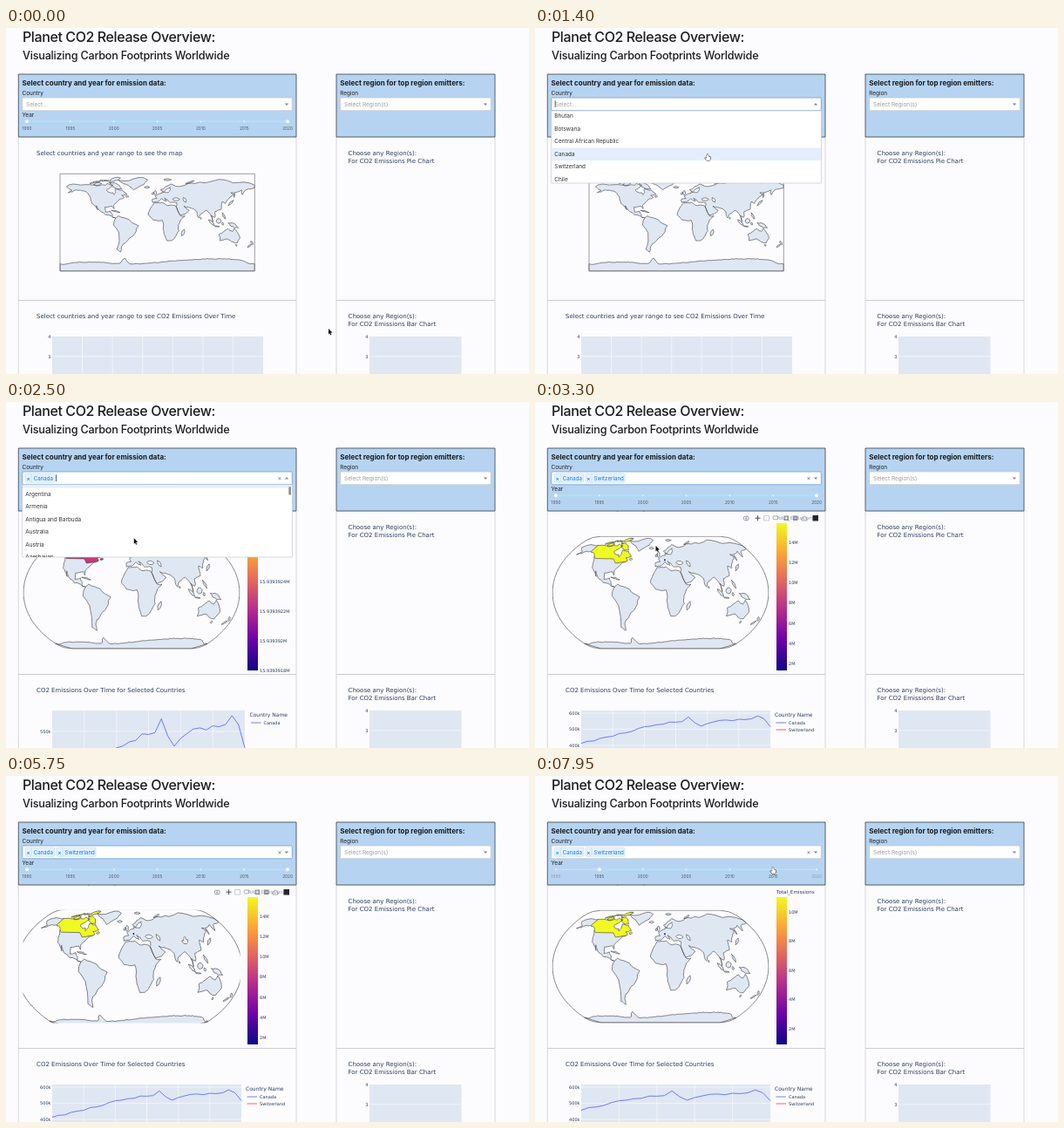
Animation of 600 by 397 pixels, one loop 8000 ms. Source, as an HTML page with a canvas:

```html
<!DOCTYPE html>
<html lang="en">
<head>
<meta charset="utf-8">
<title>Emission dashboard</title>
<style>
html, body { margin: 0; width: 100%; height: 100%; overflow: hidden; background: #fcfbfd; }
canvas { display: block; width: 600px; height: 397px; }
</style>
</head>
<body>
<canvas id="stage"></canvas>
<script>
const LOOP = 8000;
const canvas = document.getElementById('stage');
const ctx = canvas.getContext('2d');
const dpr = window.devicePixelRatio || 1;
canvas.width = 600 * dpr;
canvas.height = 397 * dpr;

const UI = 'Inter, sans-serif', PLOT = '"DejaVu Sans", sans-serif';
const PAPER = '#fcfbfd', LAND = '#dfe7f2', INK = '#2a3f5f', COAST = '#3c3c40';
const PLASMA = ['#0d0887', '#6a00a8', '#b12a90', '#e16462', '#fca636', '#f0f921'];

const ease = (t, a, b) => {
  const p = Math.min(1, Math.max(0, (t - a) / (b - a)));
  return p * p * (3 - 2 * p);
};
const between = (t, a, b) => t >= a && t < b;
const bump = (x, center, width, height) => height * Math.exp(-(((x - center) / width) ** 2));
const range = (n, f) => Array.from({ length: n }, (_, i) => f(i));

// ---- World geometry: a few key points per coast, roughened by a seeded rule ----
const noise = (x, y) => {
  const s = Math.sin(x * 12.9898 + y * 78.233) * 43758.5453;
  return s - Math.floor(s) - 0.5;
};

function roughen(points, depth = 2) {
  if (!depth) return points;
  const finer = points.flatMap(([x, y], i) => {
    const [u, v] = points[(i + 1) % points.length];
    const k = 0.22 * noise(x + u, y + v);
    return [[x, y], [Math.min(180, (x + u) / 2 + (v - y) * k), (y + v) / 2 - (u - x) * k]];
  });
  return roughen(finer, depth - 1);
}

// An island or lake: a lens between two ends
function lens([x, y, u, v, width]) {
  const len = Math.hypot(u - x, v - y), nx = (v - y) / len * width, ny = (x - u) / len * width;
  const side = (p, s) => [x + (u - x) * p + nx * s, y + (v - y) * p + ny * s];
  return roughen([[x, y], side(0.3, 1), side(0.7, 1), [u, v], side(0.7, -1), side(0.3, -1)], 1);
}

const continents = [
  // North America
  [[-168,66], [-156,71], [-128,70], [-108,68], [-95,69], [-93,72], [-82,69], [-87,64], [-94,60], [-92,57], [-82,55], [-80,51], [-77,56], [-78,62], [-70,60], [-65,60], [-56,52], [-66,50], [-61,46], [-70,43], [-76,36], [-81,31], [-80,25], [-84,30], [-97,28], [-96,19], [-87,21], [-83,15], [-82,9], [-77,8], [-86,12], [-105,20], [-113,31], [-110,23], [-121,35], [-124,47], [-135,58], [-150,60], [-165,55], [-158,59]],
  // South America
  [[-77,8], [-72,12], [-52,5], [-35,-6], [-39,-16], [-48,-27], [-57,-36], [-66,-45], [-68,-55], [-75,-50], [-71,-19], [-81,-5]],
  // Africa
  [[-6,36], [10,37], [20,31], [33,31], [43,12], [51,12], [39,-5], [40,-16], [33,-27], [26,-34], [18,-34], [12,-17], [9,4], [-8,4.5], [-17,14], [-10,30]],
  // Eurasia
  [[-9,37], [0,38], [8,44], [17,39], [13,45], [23,37], [27,37], [36,36], [35,29], [43,13], [59,22], [49,30], [67,25], [73,20], [77,8], [81,16], [91,22], [98,15], [103,1], [100,13], [106,9], [107,20], [118,24], [120,38], [126,35], [129,41], [141,52], [136,55], [156,60], [157,51], [164,60], [180,64], [180,69], [140,73], [105,77], [70,72], [44,67], [25,71], [6,60], [12,56], [18,62], [24,65], [24,60], [20,55], [9,57], [9,54], [-4,48], [-1,44], [-9,43]],
  // Australia
  [[114,-22], [116,-34], [131,-31], [139,-36], [148,-38], [153,-28], [142,-11], [139,-17], [131,-12], [123,-17]],
  // Greenland
  [[-44,60], [-53,68], [-72,78], [-35,83], [-18,79], [-25,70]]
].map(points => roughen(points));

// Both ends and half width
const islands = [
  [-66,62,-88,73,4], [-118,70,-103,72,2.5], [-125,72,-117,74,1], [-68,82,-88,77,3], [-59,48,-53,48,1.5],
  [-24,65,-14,65,1.4], [-4,50,-4,59,2.5], [-10,52,-6,55,1.5], [52,71,68,77,1], [12,79,26,79,1.5],
  [-85,22,-69,18.5,0.8], [131,31,141,41,1.3], [142,46,143,54,0.6], [95,5,106,-6,2], [109,1,118,4,4],
  [131,-1,150,-10,3], [106,-7,115,-8,0.6], [120,0,122,-5,1.5], [120,18,126,6,1.4], [50,-13,45,-25,2.5],
  [173,-35,177,-41,1.5], [174,-41,167,-46,1.3], [80,9,81,6,0.8], [145,-41,147,-44,1.2]
].map(lens);
const arcticIslets = range(8, i => {
  const lon = -118 + i * 4, lat = 76 + 4 * noise(i, 3);
  return lens([lon, lat, lon + 5, lat + 3 * noise(i, 7), 0.8]);
});
const inlandSeas = [[28,43,41.5,42.5,2.2], [48,46,53,37,2.3]].map(lens);

const antarctica = range(91, i => {
  const lon = -180 + i * 4;
  return [lon, -72.5 + 5 * Math.sin((lon - 20) * Math.PI / 180) + bump(lon, -61, 6, 11) + bump(lon, -105, 25, 3)
    - bump(Math.abs(lon), 175, 15, 6.5) + 1.4 * noise(lon, 1)];
}).concat([[180, -90], [-180, -90]]);

const landmasses = [...continents, ...islands, ...arcticIslets, antarctica];
const canadaRegion = [[-141,60], [-141,84], [-62,84], [-75,77], [-58,68], [-50,46], [-67,44], [-82,42], [-89,48.5], [-123,49], [-132,55]];
const rimPoints = range(74, i => i < 37 ? [180, -90 + i * 5] : [-180, 90 - (i - 37) * 5]);

const equirectangular = ([lon, lat]) => [173.6 + lon * 0.62, 223 - lat * 0.62];
function naturalEarth([lon, lat]) {
  const l = lon * Math.PI / 180, f = lat * Math.PI / 180, f2 = f * f, f4 = f2 * f2;
  const x = l * (0.8707 - 0.131979 * f2 + f4 * (-0.013791 + f4 * (0.003971 * f2 - 0.001529 * f4)));
  const y = f * (1.007226 + f2 * (0.015085 + f4 * (-0.044475 + 0.028874 * f2 - 0.005916 * f4)));
  return [144 + x * 45.3, 218.6 - y * 45.3];
}

function outline(polygons, project) {
  const path = new Path2D();
  for (const points of polygons) {
    points.forEach((p, i) => path[i ? 'lineTo' : 'moveTo'](...project(p)));
    path.closePath();
  }
  return path;
}
const world = project => ({ land: outline(landmasses, project), seas: outline(inlandSeas, project) });
const flatWorld = world(equirectangular), roundWorld = world(naturalEarth);
const canada = outline([canadaRegion], naturalEarth), rim = outline([rimPoints], naturalEarth);

// ---- Drawing helpers ----
function text(str, x, y, size, color, { font = UI, weight = 400, align = 'left', spacing = 0 } = {}) {
  ctx.font = `${weight} ${size}px ${font}`;
  ctx.fillStyle = color;
  ctx.textAlign = align;
  ctx.letterSpacing = spacing + 'px';
  ctx.fillText(str, x, y);
}
const label = (str, x, y, size = 7, align = 'left') => text(str, x, y, size, INK, { font: PLOT, align });

function box(x, y, w, h, fill, stroke, width = 0.6, radius = 0) {
  ctx.beginPath();
  ctx.roundRect(x, y, w, h, radius);
  if (fill) { ctx.fillStyle = fill; ctx.fill(); }
  if (stroke) { ctx.strokeStyle = stroke; ctx.lineWidth = width; ctx.stroke(); }
}

function line(points, color, width = 0.8) {
  ctx.beginPath();
  points.forEach(p => ctx.lineTo(...p));
  ctx.strokeStyle = color;
  ctx.lineWidth = width;
  ctx.stroke();
}

function dot(x, y, r, color) {
  ctx.beginPath();
  ctx.arc(x, y, r, 0, 7);
  ctx.fillStyle = color;
  ctx.fill();
}

// ---- Maps ----
function drawWorld({ land, seas }, canadaColor) {
  ctx.lineJoin = 'round';
  ctx.lineWidth = 0.6;
  ctx.strokeStyle = COAST;
  ctx.fillStyle = LAND;
  ctx.fill(land);
  if (canadaColor) {
    ctx.save();
    ctx.clip(canada);
    ctx.fillStyle = canadaColor;
    ctx.fill(land);
    ctx.restore();
    ctx.save();
    ctx.clip(land);
    ctx.stroke(canada);
    ctx.restore();
  }
  ctx.stroke(land);
  ctx.fillStyle = PAPER;
  ctx.fill(seas);
  ctx.stroke(seas);
}

function emptyMap() {
  label('Select countries and year range to see the map', 35, 145.5);
  drawWorld(flatWorld);
  box(62, 167.3, 223.3, 111.5, null, '#77777c', 0.7);
}

function colorBar(ticks) {
  const gradient = ctx.createLinearGradient(0, 308, 0, 139);
  PLASMA.forEach((c, i) => gradient.addColorStop(i / (PLASMA.length - 1), c));
  box(277, 139, 12, 169, gradient);
  label('Total_Emissions', 277, 135, 5.6);
  for (const [str, y] of ticks) label(str, 291, y + 1.7, 5);
}

function modeBar() {
  const gray = '#8b909a', dark = '#55585f';
  box(237, 128, 90, 10, 'rgba(252,251,253,0.5)');
  box(239.5, 131.3, 5.5, 4.2, null, gray, 0.9, 1);
  dot(242.2, 133.4, 1, gray);
  const plus = (x, color, r) => {
    line([[x - r, 133.2], [x + r, 133.2]], color, 1.1);
    line([[x, 133.2 - r], [x, 133.2 + r]], color, 1.1);
  };
  plus(255.5, dark, 3);
  box(262.5, 130.5, 6, 5.5, null, '#b5b9c0', 0.7);
  box(273, 130.8, 6, 4, null, gray, 0.7, 2);
  box(285.5, 130.5, 5.5, 5.5, gray);
  plus(288.2, PAPER, 1.6);
  box(296, 130.5, 5.5, 5.5, gray);
  line([[297.3, 133.2], [300.3, 133.2]], PAPER);
  line([[306, 136], [306, 133.3], [309, 130.8], [312, 133.3], [312, 136], [306, 136]], gray);
  box(318.5, 130, 6.5, 6.5, '#24262b');
}

function dataMap(t, both, trimmed) {
  label('CO2 Emissions by Country', 35, 123.8);
  const zoom = trimmed ? 1 : 1 + 0.045 * ease(t, 5200, 5700);
  ctx.save();
  ctx.beginPath();
  ctx.rect(19.5, 153.7, 249, 129.8);
  ctx.clip();
  ctx.translate(205, 187);
  ctx.scale(zoom, zoom);
  ctx.translate(-205, -187);
  drawWorld(roundWorld, both ? '#f0f921' : '#c43a7c');
  if (both) dot(...naturalEarth([8, 46.8]), 0.9, PLASMA[0]);
  ctx.stroke(rim);
  ctx.restore();
  const millions = (top, y, step) => range(top / 2, i => [`${top - 2 * i}M`, y + step * i]);
  colorBar(trimmed ? millions(10, 156, 33.5) : both ? millions(14, 161, 23.2)
    : ['926', '924', '922', '92', '918'].map((s, i) => [`15.9393${s}M`, 172 + 34 * i]));
  if (between(t, 3000, 6880)) modeBar();
}

// ---- Charts ----
// Thousands of tonnes per year since 1990: a rise, a plateau, and a few notable years
const emission = i => Math.min(413 + 9.4 * i, 521 + 1.5 * i) + 4 * Math.sin(2.3 * i)
  + bump(i, 10, 0.8, 12) + bump(i, 17, 0.8, 27) - bump(i, 19.2, 1.2, 30) + bump(i, 28, 1, 16) - bump(i, 30, 0.6, 50);

function plotArea(x, w, verticals, horizontals) {
  box(x, 354, w, 60, LAND);
  for (const v of verticals) line([[v, 354], [v, 397]], '#f8fafd', 0.7);
  for (const h of horizontals) line([[x, h], [x + w, h]], '#f8fafd', 0.7);
}

function emptyPlot(x, w, verticals) {
  plotArea(x, w, verticals, [376.7]);
  label('4', x - 1.5, 355.8, 5, 'right');
  label('3', x - 1.5, 378.6, 5, 'right');
}

function emptyChart() {
  label('Select countries and year range to see CO2 Emissions Over Time', 35, 333);
  emptyPlot(53, 242, range(6, i => 53 + (i + 1) * 34.57));
}

function dataChart(both, trimmed) {
  const width = both ? 217 : 221, first = trimmed ? 5 : 0, step = width / (30 - first);
  const yOf = both ? v => 357 + (600 - v) * 0.185 : v => 378 + (550 - v) * 0.55;
  const ticks = both ? [600, 500, 400] : [550];
  label('CO2 Emissions Over Time for Selected Countries', 35, 333);
  plotArea(53, width, range(5 - first / 5, i => 53 + (i + 1) * 5 * step), ticks.map(yOf));
  for (const v of ticks) label(v + 'k', 51.5, yOf(v) + 1.7, 5, 'right');
  line(range(31 - first, i => [53 + i * step, yOf(emission(i + first))]), '#636efa', 0.9);
  ctx.save();
  ctx.translate(30, 400);
  ctx.rotate(-Math.PI / 2);
  label('s', 0, 0, 6);
  ctx.restore();
  const x = both ? 275 : 279.5;
  const legend = (name, y, color) => {
    line([[x + 1.5, y], [x + 13, y]], color, 0.9);
    label(name, x + 16, y + 1.8, 5);
  };
  label('Country Name', x, 361.3, 6);
  legend('Canada', 368, '#636efa');
  if (both) legend('Switzerland', 376, '#ef553b');
}

// ---- Controls ----
const countries = ['Afghanistan', 'Angola', 'Albania', 'Andorra', 'United Arab Emirates', 'Argentina', 'Armenia', 'Antigua and Barbuda', 'Australia', 'Austria', 'Azerbaijan', 'Burundi', 'Belgium', 'Benin', 'Burkina Faso', 'Bangladesh', 'Bulgaria', 'Bahrain', 'Bahamas', 'Bosnia and Herzegovina', 'Belarus', 'Belize', 'Bolivia', 'Brazil', 'Barbados', 'Brunei', 'Bhutan', 'Botswana', 'Central African Republic', 'Canada', 'Switzerland', 'Chile', 'China', "Cote d'Ivoire"];

function triangle(x, y, up) {
  const d = up ? -1 : 1;
  ctx.beginPath();
  ctx.moveTo(x - 2.2, y - d);
  ctx.lineTo(x + 2.2, y - d);
  ctx.lineTo(x, y + 1.4 * d);
  ctx.fillStyle = '#888';
  ctx.fill();
}

function chip(name, x, w) {
  box(x, 82.2, w, 10, '#e6f2fe', '#b5d8fb', 0.6, 1);
  line([[x + 7, 82.2], [x + 7, 92.2]], '#b5d8fb', 0.6);
  text('×', x + 3.5, 89.6, 6.5, '#0f78e8', { align: 'center', weight: 500 });
  text(name, x + 9.5, 89.6, 6.2, '#0f78e8');
}

function slider(t) {
  const low = 24 + 49.8 * ease(t, 7000, 7250), high = 323 - 50 * ease(t, 7680, 7950);
  text('Year', 18.5, 102.3, 6.4, '#222');
  line([[24, 107.3], [323, 107.3]], '#cbdbe9', 1.5);
  line([[low, 107.3], [high, 107.3]], '#abe0fa', 1.8);
  for (let i = 0; i < 7; i++) {
    const x = 24 + i * 49.85, active = x > low - 2 && x < high + 2;
    dot(x, 107.3, 1, '#e6f5fd');
    text(1990 + i * 5, x, 117.2, 4.8, active ? '#4e5660' : '#8c9aa8', { align: 'center' });
  }
  for (const x of [low, high]) dot(x, 107.3, 2, '#fafdff');
}

function optionList(scroll, highlight, names, showThumb) {
  const row = 14.5;
  ctx.save();
  box(18.8, 95, 309.6, 83, '#fff', '#c4c8cd', 0.7);
  ctx.clip();
  names.forEach((name, i) => {
    const y = 95 + i * row - scroll;
    if (i === highlight) box(19, y, 309, row, '#e4effb');
    text(name, 22.3, y + 9.4, 6.45, '#333');
  });
  if (showThumb) box(324.3, 96 + scroll * 0.018, 2.6, 9.5, '#8c8c8c', null, 0, 1.2);
  ctx.restore();
}

function controls(t, pointerY) {
  const panel = '#b6d4f1', edge = '#36404c';
  const open = between(t, 680, 1550) || between(t, 1900, 2980);
  const focused = between(t, 680, 7000);
  const chosen = (t >= 1550) + (t >= 2980);

  const field = (x, w, title, name, border) => {
    box(x, 53, w, 72, panel, edge, 0.8);
    text(title, x + 4.3, 66.2, 8, '#16191d', { weight: 700 });
    text(name, x + 4.3, 77, 6.4, '#222');
    box(x + 4.5, 80, w - 9.2, 14.8, '#fff', border, 0.8, 1.2);
  };
  field(14.3, 318.7, 'Select country and year for emission data:', 'Country', focused ? '#6f9fd6' : '#c4c8cd');
  field(379, 182, 'Select region for top region emitters:', 'Region', '#c4c8cd');
  slider(t);
  triangle(322, 87.5, open);
  triangle(550, 87.5, false);
  text('Select Region(s)', 388, 89.5, 6.5, '#999');
  if (!chosen) text('Select...', 23, 89.5, 6.5, '#999');
  if (chosen > 0) {
    chip('Canada', 22.2, 33.5);
    text('×', 314, 90, 7.5, '#777', { align: 'center' });
  }
  if (chosen > 1) chip('Switzerland', 58, 45);
  const blinkOn = t < 2980 || (t + 200) % 1000 < 500;
  if (focused && blinkOn) {
    const x = [23.2, 57.5, 104.5][chosen];
    line([[x, 83.3], [x, 91]], '#333', 0.8);
  }
  if (!open) return;
  if (!chosen) {
    const scroll = 378 * ease(t, 850, 1250);
    const row = Math.max(0, Math.floor((pointerY - 95 + scroll) / 14.5));
    optionList(scroll, row, countries, between(t, 850, 1300));
  } else {
    const scroll = 69 * ease(t, 2250, 2480) + 289 * ease(t, 2540, 2860);
    optionList(scroll, t < 2860 ? 4 : 29, countries.filter(c => c !== 'Canada'), t > 2250);
  }
}

// ---- Pointer ----
// Arrival time, x, y; each trip takes at most 500 ms
const stops = [[0,370,345], [600,190,84], [900,190,140], [1400,198,145], [1850,170,86], [2300,147,156], [2950,138.5,165], [4500,205,185], [6600,81,128], [6950,24,105], [7250,73.8,105], [7650,323,105], [7950,273,105]];

function pointerAt(t) {
  let [start, x, y] = stops[0];
  for (const [arrival, u, v] of stops) {
    const p = ease(t, Math.max(start, arrival - 500), arrival || 1);
    x += (u - x) * p;
    y += (v - y) * p;
    start = arrival;
  }
  return [x, y];
}

function pointer(x, y, hand) {
  const shape = hand
    ? [[-0.7, 0], [0.6, 0], [0.9, 2.2], [3.4, 3], [2.6, 7], [-1, 7], [-3.2, 4], [-0.8, 4.4]]
    : [[0, 0], [0, 6.4], [1.4, 5.2], [2.4, 7.4], [3.4, 6.9], [2.5, 4.8], [4.4, 4.6]];
  ctx.beginPath();
  shape.forEach(([dx, dy]) => ctx.lineTo(x + dx, y + dy));
  ctx.closePath();
  ctx.strokeStyle = hand ? '#222' : '#fff';
  ctx.lineWidth = 1;
  ctx.stroke();
  ctx.fillStyle = hand ? '#fff' : '#111';
  ctx.fill();
}

function draw(t) {
  const [px, py] = pointerAt(t);
  const both = t >= 3080, trimmed = t >= 7350;
  ctx.setTransform(dpr, 0, 0, dpr, 0, 0);
  box(0, 0, 600, 397, PAPER);
  text('Planet CO2 Release Overview:', 19, 16, 16, '#1b1d20', { weight: 500, spacing: -0.4 });
  text('Visualizing Carbon Footprints Worldwide', 19, 35.5, 12.65, '#1b1d20', { weight: 500, spacing: -0.23 });

  for (const [x, w] of [[14.3, 318.7], [379, 182]]) {
    box(x, 125, w, 187.5, null, '#c9c9cc', 0.7);
    box(x, 312.5, w, 100, null, '#c9c9cc', 0.7);
  }
  if (t < 1650) {
    emptyMap();
    emptyChart();
  } else {
    dataMap(t, both, trimmed);
    dataChart(both, trimmed);
  }
  for (const [kind, y] of [['Pie', 145.5], ['Bar', 333]]) {
    label('Choose any Region(s):', 392.5, y);
    label(`For CO2 Emissions ${kind} Chart`, 392.5, y + 9.3);
  }
  emptyPlot(417, 105.5, []);
  controls(t, py);
  pointer(px, py, between(t, 900, 1600) || between(t, 2880, 2990) || between(t, 4300, 6150) || t > 6900);
}

function frame(now) {
  draw(now % LOOP);
  requestAnimationFrame(frame);
}
requestAnimationFrame(frame);
</script>
</body>
</html>
```
